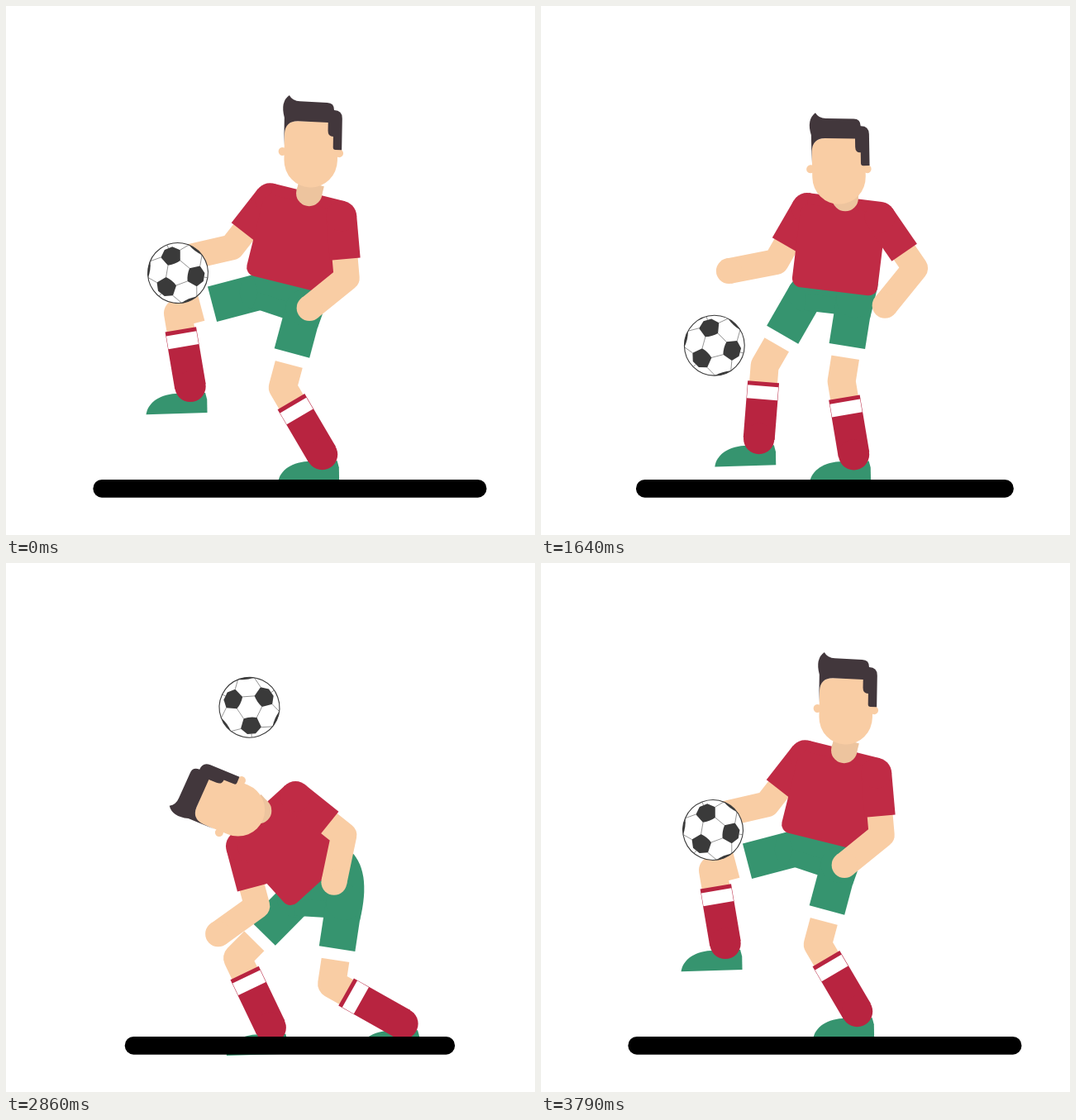
These frames come from a looping animation (640x640 px, 3870 ms). An HTML page with a canvas:

```html
<!DOCTYPE html>
<html lang="en">
<head>
<meta charset="utf-8">
<title>Football juggling</title>
<style>
html, body { margin: 0; width: 100%; height: 100%; overflow: hidden; background: #fff }
canvas { display: block }
</style>
</head>
<body>
<canvas id="stage" width="640" height="640"></canvas>
<script>
const ctx = document.getElementById('stage').getContext('2d');
const LOOP = 3870, FPS = 14, LAST = 53;
const SHIRT = '#c02b45', SOCK = '#b82440', GREEN = '#36946f', SKIN = '#f9cda4',
      NECK = '#edc49e', HAIR = '#42373c', DARK = '#3a3a3a';

// Limb angles are degrees from straight down, positive to the right; pairs are [left, right].
const wait = {
  chest: [364, 256], lean: 3, spine: 103, tilt: -1, nod: 11,
  upperArm: [-13, 30], forearm: [-59, -24], thigh: [-27, -15.6], shin: [7, 17]
};
const kick = {
  ...wait, chest: [366, 250], lean: 7, nod: 14,
  upperArm: [-30, 34.5], forearm: [-79, -39], thigh: [-30, -9], shin: [-4.5, 9.5]
};
const tap = {
  ...wait, chest: [354.5, 248.5], lean: -2, tilt: 0, nod: 7,
  upperArm: [-19, 20], forearm: [-87, -50], thigh: [-3, -41.3], shin: [0, -3]
};
const knee = {
  ...wait, chest: [362.5, 243.5], lean: 14, spine: 116, tilt: 1, nod: 0,
  upperArm: [-38, 5], forearm: [-77, -51], thigh: [-75.3, -15], shin: [9.6, 30.5]
};
const balance = {
  ...wait, chest: [303.5, 319.5], lean: -58, spine: 116, tilt: -88, nod: 17,
  upperArm: [26, 64], forearm: [-48, 0], thigh: [-48.6, -6.3], shin: [22, 60.5]
};
const gaze = {
  ...wait, chest: [373.5, 284.5], lean: 21, spine: 108, tilt: 15, nod: 12,
  upperArm: [-30, 0], forearm: [-80, -60], thigh: [-28.5, -18], shin: [40, 61]
};
const action = [[0, knee], [8, tap], [17, wait], [23, kick], [33, balance], [38, balance], [45, gaze], [LAST, knee]];

// Touches and tops of the ball's flight: time, x, y.
const flight = [[0, 208, 323], [3, 220, 290], [8.5, 250, 490], [15.4, 212, 345], [22.4, 206, 490],
                [28.5, 245, 66], [33.6, 282, 256], [38.3, 282, 256], [46, 338.5, 49], [LAST, 208, 323]];
const beats = [0, 20, 33, LAST];

const smooth = u => u * u * (3 - 2 * u);
const mix = (a, b, u) => Array.isArray(a) ? a.map((v, i) => mix(v, b[i], u)) : a + (b - a) * u;
const rad = deg => deg * Math.PI / 180;
const along = ([x, y], deg, d) => [x + Math.sin(rad(deg)) * d, y + Math.cos(rad(deg)) * d];

function segment(keys, t) {
  let i = 0;
  while (i < keys.length - 2 && t >= keys[i + 1][0]) i++;
  const a = keys[i], b = keys[i + 1];
  return [a, b, (t - a[0]) / (b[0] - a[0])];
}

function poseAt(t) {
  const [[, a], [, b], u] = segment(action, t), pose = {};
  for (const name in a) pose[name] = mix(a[name], b[name], smooth(u));
  return pose;
}

function ballAt(t) {
  const [[, x0, y0], [, x1, y1], u] = segment(flight, t);
  return [mix(x0, x1, u), mix(y0, y1, y1 < y0 ? u * (2 - u) : u * u)];
}

// The ground swells quickly into each beat and shrinks slowly after it.
function groundWidth(t) {
  const swell = beats.map(b => smooth(Math.max(0, 1 - (t < b ? (b - t) / 3 : (t - b) / 12))));
  return 353 + 123 * Math.max(...swell);
}

function line(color, width, ...points) {
  ctx.beginPath();
  points.forEach(p => ctx.lineTo(...p));
  ctx.strokeStyle = color;
  ctx.lineWidth = width;
  ctx.stroke();
}

function shape(color, path) {
  ctx.fillStyle = color;
  ctx.fill(new Path2D(path));
}

function disc(color, [x, y], r) {
  ctx.fillStyle = color;
  ctx.beginPath();
  ctx.arc(x, y, r, 0, 7);
  ctx.fill();
}

function block(color, x, y, w, h, r) {
  ctx.fillStyle = color;
  ctx.beginPath();
  ctx.roundRect(x, y, w, h, r);
  ctx.fill();
}

function placed([x, y], deg, draw) {
  ctx.save();
  ctx.translate(x, y);
  ctx.rotate(rad(deg));
  draw();
  ctx.restore();
}

function leg(hip, thigh, shin) {
  const knee = along(hip, thigh, 100);
  const down = d => along(knee, shin, d);
  const ankle = down(88 + 12 * Math.abs(Math.sin(rad(shin))));
  line(SKIN, 34, along(hip, thigh, 70), knee, down(24));
  placed(ankle, -1, () => shape(GREEN, 'M-54 33C-52 18-36 8-14 8H18L20 16V32Z'));
  line(SOCK, 38, down(20), ankle);
  disc(SOCK, ankle, 18.7);
  line('#fff', 37, down(25), down(41));
  line('#fff', 45, along(hip, thigh, 56), along(hip, thigh, 71));
  line(GREEN, 44, hip, along(hip, thigh, 57));
  disc(GREEN, hip, 22);
}

function arm(shoulder, upper, lower) {
  const elbow = along(shoulder, upper, 75), hand = along(elbow, lower, 58);
  line(SKIN, 31, shoulder, elbow, hand);
  disc(SKIN, hand, 15.5);
  line(SHIRT, 37, shoulder, along(shoulder, upper, 52));
  disc(SHIRT, shoulder, 18.5);
}

function pelvis(hipL, hipR, thighR, waistL, waistR) {
  const seat = (out, d) => along(along(hipR, thighR + 90, out), thighR, d);
  line(GREEN, 40, hipL, hipR);
  ctx.beginPath();
  ctx.moveTo(...waistL);
  ctx.lineTo(...waistR);
  ctx.quadraticCurveTo(...seat(28, -45), ...seat(22, 20));
  ctx.lineTo(...hipR);
  ctx.lineTo(...hipL);
  ctx.fillStyle = GREEN;
  ctx.fill();
}

function head() {
  disc(SKIN, [-34, -43], 5);
  disc(SKIN, [34.5, -42], 5);
  shape(SKIN, 'M-32-66Q-31-80-16-80H32.5V-33A32.2 33 0 0 1-32-33Z');
  shape(HAIR, 'M-32.5-50V-84Q-38-103-27-111Q-23-104-14-104L19-103Q27.5-103 27.5-94Q37.5-94 37.5-84' +
    'V-46H30Q27-46 27-49V-62Q20.5-62 20.5-69V-79L-16-80Q-31-80-32-65Z');
}

function ball() {
  disc('#fff', [0, 0], 36.4);
  ctx.strokeStyle = DARK;
  ctx.lineWidth = .5;
  for (let i = 0; i < 3; i++) {
    ctx.stroke(new Path2D('M13 8L0 15.3M25 12.5L27 24.5M-1.7 28L10 35M32 0H36'));
    shape(DARK, 'M13-8L25-12.5L32-5V5L25 12.5L13 8Q11 0 13-8Z');
    shape(DARK, 'M27 24.5Q17 28 10 35A36.4 36.4 0 0 0 27 24.5Z');
    ctx.rotate(rad(120));
  }
  ctx.lineWidth = 1.1;
  ctx.beginPath();
  ctx.arc(0, 0, 36.4, 0, 7);
  ctx.stroke();
}

function player({ chest, lean, spine, tilt, nod, upperArm, forearm, thigh, shin }) {
  const across = (p, deg, d) => along(p, 90 - deg, d);
  const pelvisTilt = .27 * (thigh[1] - thigh[0]) + .15 * lean;
  const middle = along(chest, -.85 * lean - 3, spine), waist = along(chest, -lean, 90);
  const [hipL, hipR] = [-29.5, 29.5].map(d => across(middle, pelvisTilt, d));
  const [shoulderL, shoulderR] = [-44.5, 44.5].map(d => across(chest, lean, d));

  leg(hipL, thigh[0], shin[0]);
  pelvis(hipL, hipR, thigh[1], across(waist, lean, -46), across(waist, lean, 49));
  leg(hipR, thigh[1], shin[1]);

  arm(shoulderL, upperArm[0], forearm[0]);
  line(SHIRT, 37, shoulderL, shoulderR);
  placed(chest, lean, () => block(SHIRT, -52, -5, 104, 101, 11));
  arm(shoulderR, upperArm[1], forearm[1]);

  const neck = along(chest, -lean, -17.5);
  line(NECK, 31, neck, along(chest, -lean, -30));
  disc(NECK, neck, 15.7);
  placed(neck, tilt, () => {
    ctx.translate(1 - .6 * nod, nod - 7);
    head();
  });
}

function draw(t) {
  const u = t / LAST, width = groundWidth(t);
  block('#fff', 0, 0, 640, 640, 0);
  ctx.lineJoin = 'round';
  player(poseAt(t));
  placed(ballAt(t), 9 + 240 * u + 22 * Math.sin(Math.PI * u), ball);
  block('#000', 343.4 - width / 2, 573, width, 21.7, 10.5);
}

function tick() {
  const ms = performance.now() % LOOP;
  draw(Math.min(LAST, Math.floor((ms + 5) * FPS / 1000)));
  requestAnimationFrame(tick);
}
tick();
</script>
</body>
</html>
```
